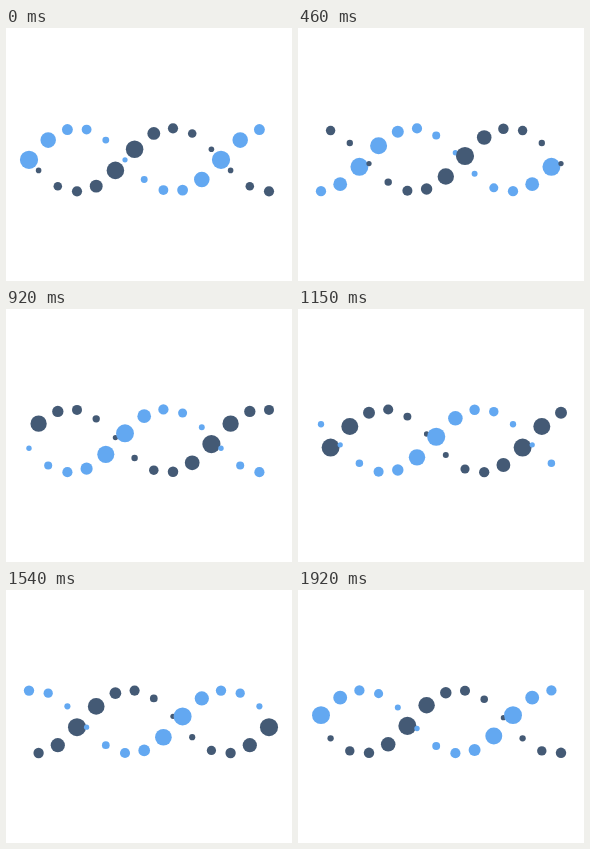
Recreate the animation shown at these times as an HTML page. Size 286 by 253 pixels, loop 2000 ms.

```html
<!DOCTYPE html>
<html lang="en">
<head>
<meta charset="utf-8">
<title>Helix loader</title>
<style>
  html, body { margin: 0; width: 100%; height: 100%; overflow: hidden; background: #fff; }
  svg { display: block; width: 286px; height: 253px; }
  .front { fill: #63a8f1; }
  .back { fill: #445a75; }
</style>
</head>
<body>
<svg id="helix" viewBox="0 0 286 253"></svg>
<script>
const LOOP = 2000, STEPS = 26, TURN = 25.8;
const COUNT = 26, LEFT = 23, PITCH = 9.6;
const MID_Y = 131.8, SWING = 31.5;
const R_NEAR = 9.1, R_SIDE = 5.1, R_FAR = 2.6;

const svg = document.getElementById('helix');
const dots = Array.from({ length: COUNT }, (_, n) => {
  const dot = document.createElementNS('http://www.w3.org/2000/svg', 'circle');
  dot.setAttribute('class', n % 2 ? 'back' : 'front');
  dot.setAttribute('cx', LEFT + n * PITCH);
  return svg.appendChild(dot);
});

const wrap = v => v - Math.floor(v);
const mix = (a, b, t) => a + (b - a) * t;

// cubic-bezier(.42, 0, .58, 1), solved by bisection
function easeInOut(x) {
  let lo = 0, hi = 1;
  for (let i = 0; i < 24; i++) {
    const s = (lo + hi) / 2, q = 1 - s;
    if (1.26 * s * q * q + 1.74 * s * s * q + s * s * s < x) lo = s;
    else hi = s;
  }
  return lo * lo * (3 - 2 * lo);
}

// Phase 0 is the nearest point, moving down through the middle.
function height(phase) {
  const p = wrap(phase + 0.25) * 2;
  const down = easeInOut(p < 1 ? p : 2 - p);
  return mix(MID_Y - SWING, MID_Y + SWING, down);
}

function radius(phase) {
  const p = wrap(phase);
  const d = Math.min(p, 1 - p) * 4;
  return d < 1
    ? mix(R_NEAR, R_SIDE, easeInOut(d))
    : mix(R_SIDE, R_FAR, easeInOut(d - 1));
}

// Steps start on whole hundredths of a second.
const stepStart = k => Math.round(k * LOOP / STEPS / 10) * 10;

function stepAt(time) {
  let k = STEPS - 1;
  while (stepStart(k) > time) k--;
  return k;
}

let shown = -1;
function draw(step) {
  if (step === shown) return;
  shown = step;
  dots.forEach((dot, n) => {
    const phase = step / TURN - n / 20 + (n % 2) / 2;
    dot.setAttribute('cy', height(phase).toFixed(2));
    dot.setAttribute('r', radius(phase).toFixed(2));
  });
}

const start = performance.now();
function tick() {
  draw(stepAt((performance.now() - start) % LOOP));
  requestAnimationFrame(tick);
}
draw(0);
requestAnimationFrame(tick);
</script>
</body>
</html>
```
